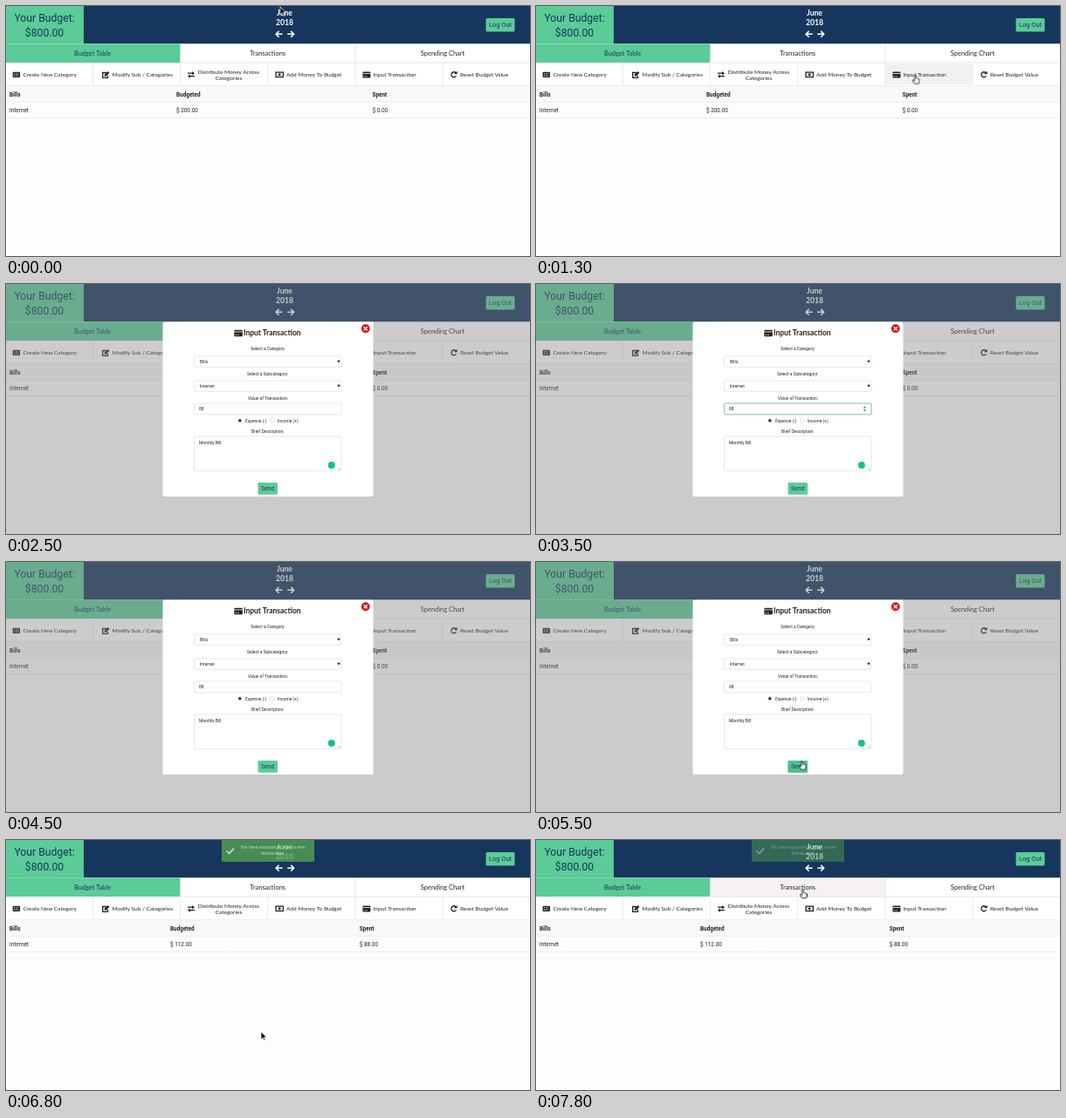
These frames come from a looping animation (600 by 287 pixels, 8 s). An HTML page:

```html
<!DOCTYPE html>
<html lang="en">
<head>
<meta charset="utf-8">
<title>Budget app</title>
<style>
html, body { margin: 0; width: 100%; height: 100%; overflow: hidden; background: #fdfdfd; }
svg { display: block; width: 600px; height: 287px; }
text { fill: #222; white-space: pre; }
.roboto { font-family: Roboto, "Liberation Sans", sans-serif; }
.lato { font-family: Lato, "Open Sans", sans-serif; }
.mid { text-anchor: middle; }
.bold { font-weight: 700; }
.navy { fill: #17365d; }
.white { fill: #fff; }
.green { fill: #5bcb98; }
.line { fill: none; stroke: #222; stroke-width: 1.3; }
.rule { stroke: #e6e6e6; stroke-width: 1; }
.field { fill: #fff; stroke: #dcdedf; stroke-width: .7; }
.focus { fill: none; stroke: #7fc4b4; stroke-width: .9; }
.tab { font-size: 7.45px; }
.tool { font-size: 6.5px; }
.table { font-size: 6.4px; }
.form { font-size: 4.92px; }

/* Every state change is a hard step on one 8 s clock. */
.step { animation: 8s step-end infinite; opacity: 0; }
.tool-hover { animation-name: toolHover; }
.modal { animation-name: modal; }
.value-focus { animation-name: valueFocus; }
.caret { animation-name: caret; }
.note-focus { animation-name: noteFocus; }
.send-hover { animation-name: sendHover; }
.before { animation-name: before; }
.after { animation-name: after; }
.toast { animation-name: toast; }
.tab-hover { animation-name: tabHover; }
.arrow { animation-name: arrow; }
.hand { animation-name: hand; }
.cursor { animation: move 8s step-end infinite; }

@keyframes toolHover { 0% { opacity: 0 } 10% { opacity: 1 } 22.5%, 100% { opacity: 0 } }
@keyframes modal { 0% { opacity: 0 } 22.5% { opacity: 1 } 72.5%, 100% { opacity: 0 } }
@keyframes valueFocus { 0% { opacity: 0 } 37.5% { opacity: 1 } 47.5%, 100% { opacity: 0 } }
@keyframes caret { 0% { opacity: 0 } 37.5% { opacity: 1 } 41.25%, 100% { opacity: 0 } }
@keyframes noteFocus { 0% { opacity: 0 } 47.5% { opacity: 1 } 53.75%, 100% { opacity: 0 } }
@keyframes sendHover { 0% { opacity: 0 } 62.5% { opacity: 1 } 72.5%, 100% { opacity: 0 } }
@keyframes before { 0% { opacity: 1 } 75%, 100% { opacity: 0 } }
@keyframes after { 0% { opacity: 0 } 75%, 100% { opacity: 1 } }
@keyframes toast {
  0% { opacity: 0 } 72.5% { opacity: .2 } 75% { opacity: .6 }
  78.75% { opacity: .8 } 97.5%, 100% { opacity: .48 }
}
@keyframes tabHover { 0% { opacity: 0 } 93.75%, 100% { opacity: 1 } }
@keyframes arrow {
  0% { opacity: 1 } 10% { opacity: 0 } 25% { opacity: 1 } 31.25% { opacity: 0 }
  60% { opacity: 1 } 62.5% { opacity: 0 } 75% { opacity: 1 } 93.75%, 100% { opacity: 0 }
}
@keyframes hand {
  0% { opacity: 0 } 10% { opacity: 1 } 25% { opacity: 0 }
  62.5% { opacity: 1 } 75% { opacity: 0 } 93.75%, 100% { opacity: 1 }
}
@keyframes move {
  0% { transform: translate(314px, 1px) }
  3.75% { transform: translate(352px, 30px) }
  6.25% { transform: translate(425px, 91px) }
  10% { transform: translate(433px, 82px) }
  12.5% { transform: translate(434.5px, 79.5px) }
  25% { transform: translate(368px, 105px) }
  28.75% { transform: translate(322px, 133px) }
  60% { transform: translate(272px, 214px) }
  62.5% { transform: translate(301px, 229px) }
  66.25% { transform: translate(307px, 230px) }
  68.75% { transform: translate(304.5px, 228.5px) }
  85% { transform: translate(292px, 220px) }
  87.5% { transform: translate(278px, 206px) }
  91.25% { transform: translate(298px, 112px) }
  93.75%, 100% { transform: translate(305.5px, 57px) }
}
</style>
</head>
<body>
<svg viewBox="0 0 600 287">
  <defs>
    <g id="card">
      <rect width="9" height="7" rx="1" fill="#222"/>
      <path d="M0 2H9" stroke="#fff" stroke-width=".8"/>
      <path d="M1.2 5.3H2.6M3.4 5.3H5.2" stroke="#fff" stroke-width=".7"/>
    </g>
    <path id="left" d="M8.3 4H1.2M4.3 .6L.9 4L4.3 7.4" fill="none" stroke="#fff" stroke-width="1.6"/>
  </defs>

  <rect width="600" height="287" fill="#fdfdfd"/>

  <!-- header -->
  <rect class="navy" width="600" height="43.5"/>
  <rect class="green" width="89" height="44"/>
  <g class="roboto mid" font-size="12.2">
    <text class="navy" x="44" y="17.5">Your Budget:</text>
    <text class="navy" x="44" y="34.8">$800.00</text>
  </g>
  <g class="lato mid bold" font-size="8.6">
    <text class="white" x="319" y="11">June</text>
    <text class="white" x="319" y="22">2018</text>
  </g>
  <use href="#left" x="308.3" y="28.3"/>
  <use href="#left" transform="translate(330.5 28.3) scale(-1 1)"/>
  <rect class="green" x="549.5" y="14" width="33" height="15.5" rx="1.5"/>
  <text class="roboto mid navy" x="566" y="24.4" font-size="7.5">Log Out</text>

  <!-- tabs -->
  <rect class="white" y="43.5" width="600" height="48"/>
  <rect class="green" y="43.5" width="199.5" height="21.5"/>
  <rect class="step tab-hover" x="200" y="44" width="200" height="21" fill="#f6f2f2"/>
  <path class="rule" d="M200 65H600M200 44V65M400 44V65" fill="none"/>
  <g class="lato mid tab">
    <text class="navy" x="99" y="57">Budget Table</text>
    <text x="299.7" y="57">Transactions</text>
    <text x="500" y="57">Spending Chart</text>
  </g>

  <!-- toolbar -->
  <rect class="step tool-hover" x="400" y="66.5" width="100" height="23.5" fill="#f1f1f1"/>
  <path class="rule" d="M99.5 66V91M199.5 66V91M299.5 66V91M400 66V91M500 66V91" stroke-opacity=".8"/>
  <g class="lato tool">
    <text x="19.4" y="81">Create New Category</text>
    <text x="121.6" y="81">Modify Sub / Categories</text>
    <text class="mid" x="255" y="78">Distribute Money Across</text>
    <text class="mid" x="255" y="84.5">Categories</text>
    <text x="321" y="81">Add Money To Budget</text>
    <text x="420.5" y="81">Input Transaction</text>
    <text x="520" y="81">Reset Budget Value</text>
  </g>
  <rect x="7.7" y="75.8" width="8.4" height="6.2" rx=".8" fill="#222"/>
  <path d="M9 77.5H15M9 79H15M9 80.5H15" stroke="#fff" stroke-width=".6" stroke-dasharray="1 .5"/>
  <path class="line" d="M115 76.5H110.7V82.3H116.5V79.8" stroke-width="1"/>
  <path d="M112.5 80.8L113 78.5L116.6 74.9L118.5 76.8L114.8 80.4Z" fill="#222"/>
  <path class="line" d="M208 77.2H214M216 80.6H210"/>
  <path d="M213 75L216 77.2L213 79.4ZM211 78.4L208 80.6L211 82.8Z" fill="#222"/>
  <rect class="line" x="309" y="76.1" width="8.4" height="5.4" stroke-width="1"/>
  <circle cx="313.2" cy="78.8" r="1.5" fill="#222"/>
  <use href="#card" x="408.4" y="75.5"/>
  <path class="line" d="M515.2 76.8A3 3 0 1 0 515.5 80.3"/>
  <path d="M516.6 74.7V78.3H513Z" fill="#222"/>

  <!-- table -->
  <rect y="91.5" width="600" height="18.5" fill="#f8f9fb"/>
  <path class="rule" d="M0 91.8H600M0 110.2H600M0 128.5H600" stroke-opacity=".75"/>
  <g class="roboto table">
    <text class="bold" x="4" y="103.5">Bills</text>
    <text x="4" y="122">Internet</text>
    <g class="step before">
      <text class="bold" x="195" y="103.5">Budgeted</text>
      <text class="bold" x="419.5" y="103.5">Spent</text>
      <text x="195" y="122">$ 200.00</text>
      <text x="419.5" y="122">$ 0.00</text>
    </g>
    <g class="step after">
      <text class="bold" x="188" y="103.5">Budgeted</text>
      <text class="bold" x="404.8" y="103.5">Spent</text>
      <text x="188" y="122">$ 112.00</text>
      <text x="404.8" y="122">$ 88.00</text>
    </g>
  </g>

  <!-- transaction dialog -->
  <g class="step modal">
    <rect width="600" height="287" fill="#808080" fill-opacity=".4"/>
    <rect class="white" x="179.5" y="43.5" width="241" height="200.5" rx="2"/>
    <circle cx="411.7" cy="51.2" r="4.9" fill="#e01010"/>
    <path d="M409.7 49.2L413.7 53.2M413.7 49.2L409.7 53.2" stroke="#fff" stroke-width="1.4"/>
    <use href="#card" transform="translate(261.3 52.8) scale(1.06)"/>
    <text class="lato bold" x="272" y="59.3" font-size="8.5">Input Transaction</text>

    <rect class="field" x="215.5" y="83" width="168.5" height="12.3" rx="1"/>
    <rect class="field" x="215.5" y="111" width="168.5" height="12.3" rx="1"/>
    <rect class="field" x="215.5" y="137" width="168.5" height="12.8" rx="1"/>
    <rect class="field" x="215.5" y="175" width="168.5" height="39.5" rx="1"/>
    <path d="M379.2 87.8H382.8L381 90.6ZM379.2 115.8H382.8L381 118.6Z" fill="#111"/>
    <path d="M380.5 213.5L383 211M382 213.5L383 212.5" stroke="#888" stroke-width=".5"/>
    <circle cx="372.8" cy="208" r="4" fill="#15c08f"/>

    <g class="roboto form">
      <g class="mid">
        <text x="300" y="76.2">Select a Category:</text>
        <text x="299.7" y="104.5">Select a Subcategory:</text>
        <text x="300" y="132.6">Value of Transaction:</text>
        <text x="299.7" y="170.5">Brief Description:</text>
      </g>
      <text x="222" y="91">Bills</text>
      <text x="222" y="119">Internet</text>
      <text x="221" y="145.3">88</text>
      <text x="221" y="184">Monthly Bill</text>
      <text x="274" y="158.6">Expense (-)</text>
      <text x="311" y="158.6">Income (+)</text>
    </g>
    <circle cx="267.8" cy="156.8" r="2.3" fill="#fff" stroke="#aaa" stroke-width=".5"/>
    <circle cx="267.8" cy="156.8" r="1.5" fill="#111"/>
    <circle cx="304.8" cy="156.8" r="2.3" fill="#fff" stroke="#ccc" stroke-width=".6"/>

    <g class="step value-focus">
      <rect class="focus" x="215.5" y="137" width="168.5" height="12.8" rx="1"/>
      <path d="M374.7 142.6L376.2 140.5L377.7 142.6ZM374.7 143.9L376.2 146L377.7 143.9Z" fill="#555"/>
    </g>
    <path class="step caret" d="M227.3 140.7V146.3" stroke="#222" stroke-width=".5"/>
    <rect class="step note-focus focus" x="215.5" y="175" width="168.5" height="39.5" rx="1"/>

    <rect class="green" x="288.5" y="228" width="22.5" height="13.8" rx="1.3"/>
    <rect class="step send-hover" x="288.5" y="228" width="22.5" height="13.8" rx="1.3" fill="#50c18d"/>
    <text class="roboto mid navy" x="299.7" y="237.4" font-size="6.8">Send</text>
  </g>

  <!-- toast -->
  <g class="step toast">
    <rect x="247" y="-2" width="106" height="27" rx="1.5" fill="#51a351"/>
    <path d="M252.5 12.5L255.5 15.6L261 9.6" fill="none" stroke="#fff" stroke-width="1.7"/>
    <g class="lato mid" font-size="5">
      <text class="white" x="305.5" y="10">You have successfully input a new</text>
      <text class="white" x="305.5" y="17">transaction!</text>
    </g>
  </g>

  <!-- pointer -->
  <g class="cursor" stroke-linejoin="round">
    <path class="step arrow" d="M0 0V9L2.1 7.1L3.6 10.3L5 9.6L3.6 6.6H6.4Z" fill="#111" stroke="#fff" stroke-width=".7"/>
    <path class="step hand" d="M-.9 .8Q0 -.4 .9 .8V3.7Q1.7 3.1 2.3 4Q3 3.5 3.5 4.3Q4.5 4 4.5 5.2V7.2L3.7 9.8H-.8L-3.1 6.6Q-3.7 5.2 -2.2 5.4L-.9 6.5Z" fill="#fff" stroke="#111" stroke-width=".85"/>
  </g>
</svg>
</body>
</html>
```
